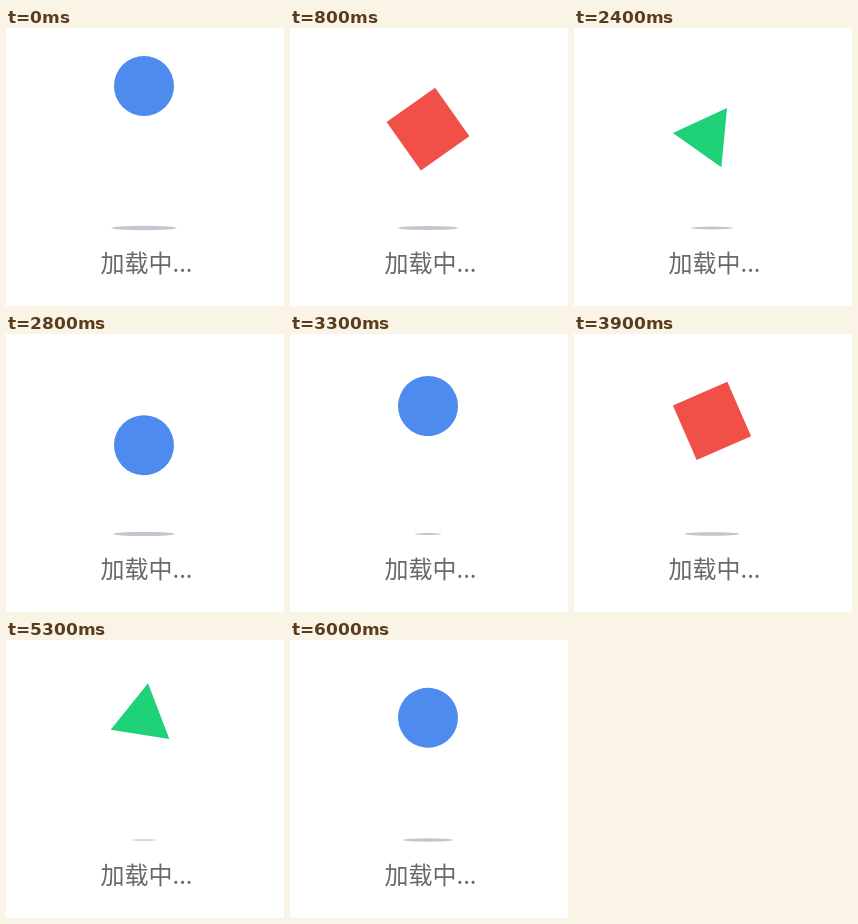
Write an HTML page with a canvas that moves like this. It is 278 px wide and 278 px high and loops after 6.1 s.

```html
<!DOCTYPE html>
<html lang="zh">
<head>
<meta charset="utf-8">
<style>
  html, body { margin: 0; width: 100%; height: 100%; overflow: hidden; background: #fff; }
  canvas { display: block; }
</style>
</head>
<body>
<canvas id="stage" width="278" height="278"></canvas>
<script>
const ctx = document.getElementById('stage').getContext('2d');
const LOOP = 6100, STEP = 100;
const FALL = 522, RISE = 535;
const CENTER_X = 138, TOP_Y = 58, DROP = 110;
// Times at which the shape reaches its highest point.
const peaks = [80, 1104, 2103, 3145, 4140, 5165, 6193];

function polygon(...points) {
  points.forEach(([x, y]) => ctx.lineTo(x, y));
  ctx.closePath();
}

const shapes = [
  { color: '#4d8bee', trace: () => ctx.arc(0, 0, 30, 0, Math.PI * 2) },
  { color: '#f05048', trace: () => ctx.rect(-29.7, -29.7, 59.4, 59.4) },
  { color: '#1fd177', trace: () => polygon([0, -26], [29.7, 25.7], [-29.7, 25.7]) }
];

// cubic-bezier(.42, 0, 1, 1)
function easeIn(x) {
  let lo = 0, hi = 1;
  for (let i = 0; i < 24; i++) {
    const u = (lo + hi) / 2, v = 1 - u;
    if (1.26 * u * v * v + 3 * u * u * v + u * u * u < x) lo = u;
    else hi = u;
  }
  return lo * lo * (3 - 2 * lo);
}

function pose(t) {
  if (t < peaks[0]) return { kind: 0, drop: 0, turn: 0, shadow: 1 };
  let k = 0;
  while (t >= peaks[k + 1]) k++;
  const since = t - peaks[k];
  if (since < FALL) {
    const x = since / FALL, drop = easeIn(x);
    return { kind: k % 3, drop, turn: drop, shadow: 0.15 + 0.85 * x };
  }
  const x = Math.min(1, (peaks[k + 1] - t) / RISE), drop = easeIn(x);
  return {
    kind: (k + 1) % 3, drop, turn: 1 - drop,
    shadow: 1 - 0.85 * Math.pow(1 - x, 2.7)
  };
}

function draw(t) {
  const { kind, drop, turn, shadow } = pose(t);
  ctx.fillStyle = '#fff';
  ctx.fillRect(0, 0, 278, 278);

  ctx.fillStyle = '#c5c5cf';
  ctx.beginPath();
  ctx.ellipse(CENTER_X, 200, 33 * shadow, 2.2 * shadow, 0, 0, Math.PI * 2);
  ctx.fill();

  ctx.fillStyle = '#696969';
  ctx.font = '300 24px "Noto Sans CJK SC", "Noto Sans CJK", sans-serif';
  ctx.fillText('加载中...', 94.5, 244);

  ctx.save();
  ctx.translate(CENTER_X, TOP_Y + DROP * drop);
  ctx.rotate(turn * Math.PI / 2);
  ctx.fillStyle = shapes[kind].color;
  ctx.beginPath();
  shapes[kind].trace();
  ctx.fill();
  ctx.restore();
}

const start = performance.now();
function tick() {
  const t = (performance.now() - start) % LOOP;
  draw(Math.floor(t / STEP) * STEP);
  requestAnimationFrame(tick);
}
tick();
</script>
</body>
</html>
```
